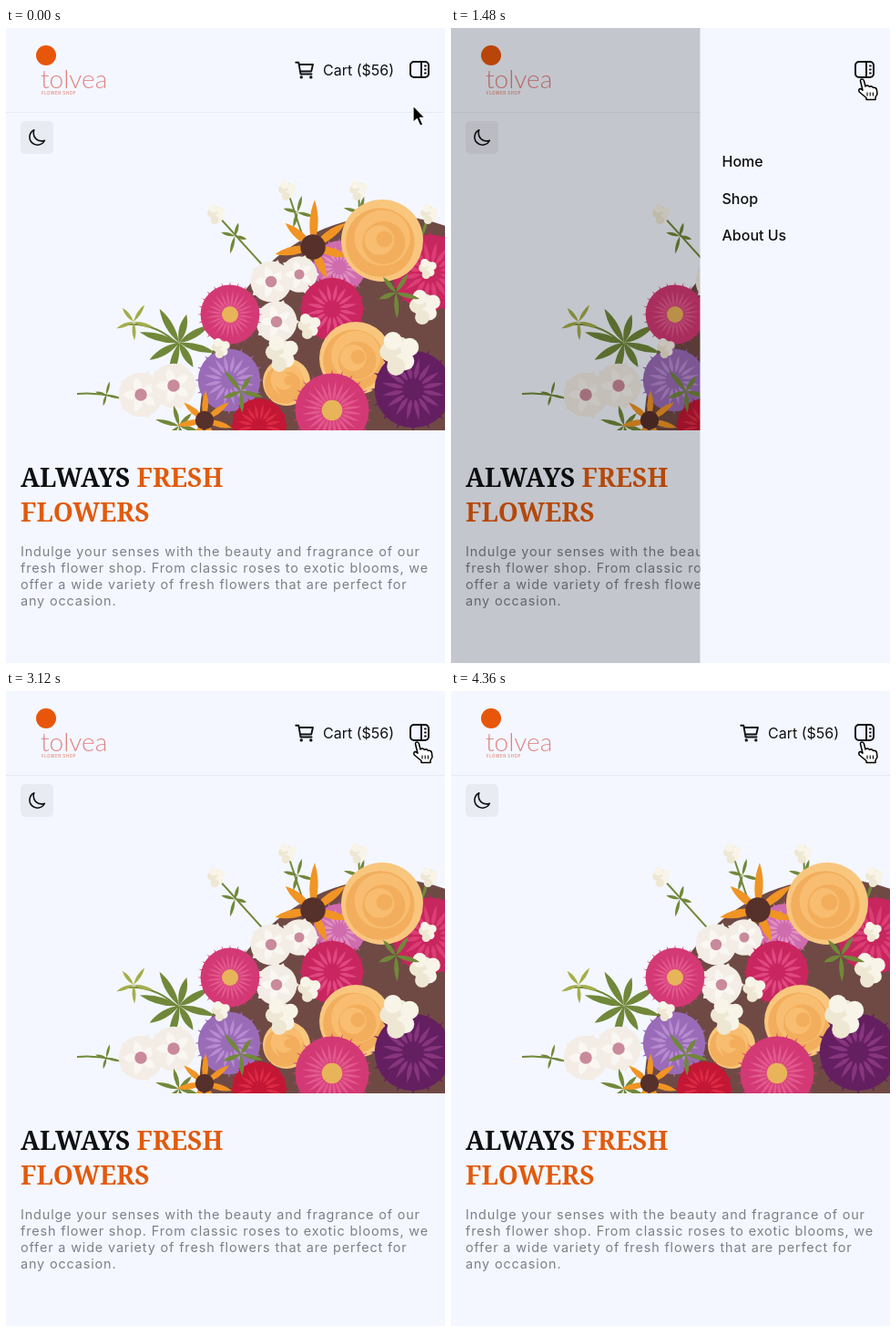
An HTML page for the animation above (4640 ms loop, 482x696 px).

```html
<!DOCTYPE html>
<html lang="en">
<head>
<meta charset="utf-8">
<title>Flower shop menu</title>
<style>
  html, body { margin: 0; width: 100%; height: 100%; overflow: hidden; background: #f4f7ff; }
  svg { display: block; width: 100vw; height: 100vh; }
  text { font-family: Inter, "Liberation Sans", sans-serif; fill: #0f1013; }
  .title { font: 700 28px "Noto Serif", serif; }
  .accent { fill: #e25a0c; }
  .copy { font-size: 14.4px; letter-spacing: .06em; fill: #7d7f86; }
  .label { font-size: 16px; }
  .menu text { font-size: 16px; font-weight: 500; }
  .brand { font: 300 28px Lato, sans-serif; fill: #e08484; }
  .tagline { font-size: 4.5px; letter-spacing: .5px; fill: #df6c55; }
  .icon { fill: none; stroke: #0f1013; stroke-width: 2; stroke-linecap: round; stroke-linejoin: round; }
  .glyph { stroke-width: 40; }
</style>
</head>
<body>
<svg viewBox="0 0 482 696" preserveAspectRatio="none">
  <clipPath id="photo"><rect x="76" y="158" width="406" height="283"/></clipPath>

  <rect width="482" height="696" fill="#f4f7ff"/>
  <path d="M0 92.5H482" stroke="#e8ebf3"/>

  <circle cx="44" cy="30" r="11" fill="#e8560c"/>
  <text class="brand" x="38" y="66">tolvea</text>
  <text class="tagline" x="39" y="73">FLOWER SHOP</text>

  <g class="icon glyph" transform="translate(316 34) scale(.047)">
    <circle cx="176" cy="424" r="16"/><circle cx="400" cy="424" r="16"/>
    <path d="M48 80H112L160 352H416M160 288H409L446 128H128"/>
  </g>
  <text class="label" x="348" y="52">Cart ($56)</text>

  <rect x="16" y="102" width="36" height="36" rx="5" fill="#e9ebf3"/>
  <path class="icon glyph" transform="translate(23.8 109.8) scale(.04)"
    d="M160 136c0-31 5-62 16-88a216 216 0 1 0 288 288c-26 11-57 16-88 16a216 216 0 0 1-216-216z"/>

  <g id="bouquet" clip-path="url(#photo)"></g>

  <text class="title" x="16" y="503">ALWAYS <tspan class="accent">FRESH</tspan></text>
  <text class="title accent" x="16" y="541">FLOWERS</text>
  <text class="copy" x="16" y="579">Indulge your senses with the beauty and fragrance of our</text>
  <text class="copy" x="16" y="597">fresh flower shop. From classic roses to exotic blooms, we</text>
  <text class="copy" x="16" y="615">offer a wide variety of fresh flowers that are perfect for</text>
  <text class="copy" x="16" y="633">any occasion.</text>

  <rect id="shade" width="482" height="696"/>
  <g id="panel" class="menu">
    <rect width="256" height="696" fill="#f4f7ff"/>
    <text x="24" y="152">Home</text>
    <text x="24" y="193">Shop</text>
    <text x="24" y="233">About Us</text>
  </g>

  <g class="icon">
    <rect x="444" y="37" width="20" height="17" rx="4"/>
    <path d="M456 37V54M460 41.5h.8M460 45.5h.8M460 49.5h.8"/>
  </g>

  <g id="cursor" stroke-linejoin="round">
    <path id="arrow" d="M0 0V18.5L4.2 14.6 7.6 22.2 10.8 20.8 7.5 13.4H13Z" stroke="#fff" stroke-width="1.2"/>
    <g id="hand" fill="#fff" stroke="#000" stroke-width="1.5">
      <path d="M-3.5 2Q-3.6 0-1.7 0Q0 0 .5 2L2 8Q4.5 6 6.3 8.4Q8.8 7 10.5 9.4Q13.8 8.7 14.5 12L15 16.5 13 20V22.5H3V20.5L-4.8 14Q-6 10.8-3.6 10.4L-1 12.2Z"/>
      <path stroke-width="1.1" d="M4 14.5v4M7.2 14.5v4M10.4 14.5v4"/>
    </g>
  </g>
</svg>

<script>
const LOOP = 4640, STAGE = 482, PANEL = 256, DIM = 0.2;
const SLIDE = 300, FADE = 150;
const visits = [{ show: 1321, hide: 2200 }, { show: 3164, hide: 3990 }];

const $ = id => document.getElementById(id);
const clamp = v => Math.min(1, Math.max(0, v));
const lerp = (a, b, k) => a + (b - a) * k;
const easeOut = k => 1 - (1 - k) ** 2;

// cubic-bezier(.4, 0, .2, 1), solved for x by bisection
function easeInOut(x) {
  let lo = 0, hi = 1;
  for (let i = 0; i < 20; i++) {
    const s = (lo + hi) / 2, r = 1 - s;
    if (1.2 * r * r * s + 0.6 * r * s * s + s ** 3 < x) lo = s; else hi = s;
  }
  return lo * lo * (3 - 2 * lo);
}

function add(tag, attrs) {
  const el = document.createElementNS($('bouquet').namespaceURI, tag);
  for (const key in attrs) el.setAttribute(key, attrs[key]);
  $('bouquet').append(el);
}
const dot = (cx, cy, r, fill) => add('circle', { cx, cy, r, fill });

let seed = 7;
const random = () => (seed = seed * 16807 % 2147483647) / 2147483647;

// Pointed leaf or petal growing from (x, y) at an angle in degrees
function leaf(x, y, length, width, angle, fill) {
  add('path', {
    d: `M0 0Q${length / 2} ${-width} ${length} 0Q${length / 2} ${width} 0 0`,
    transform: `translate(${x} ${y}) rotate(${angle})`, fill
  });
}
function spray(x, y, length, count, fill = '#71883a') {
  for (let i = 0; i < count; i++) leaf(x, y, length * (0.75 + random() * 0.4), length / 5, i * 360 / count + 15, fill);
}

// Rings of petals, each ring smaller and turned by half a petal
function flower(x, y, r, petals, shades, heart) {
  dot(x, y, r * 0.9, shades[0]);
  shades.forEach((fill, ring) => {
    const size = r * (1 - ring * 0.27);
    for (let i = 0; i < petals; i++) {
      leaf(x, y, size, size * 2.4 / petals, (i + ring / 2) * 360 / petals, fill);
    }
  });
  dot(x, y, r * 0.25, heart);
}
const rose = (x, y, r) => {
  dot(x, y, r, '#f9c67e');
  for (let k = 1; k < 6; k++) {
    dot(x + 3 * Math.cos(k * 2.4), y + 3 * Math.sin(k * 2.4), r * (1 - k * 0.16), k % 2 ? '#f2ae5c' : '#f8bd70');
  }
};
const aster = (x, y, r) => flower(x, y, r, 24, ['#d33974', '#e2588e', '#d8457b'], '#e8b45a');
const dahlia = (x, y, r, dark, light) => flower(x, y, r, 16, [dark, light, dark], dark);
const phlox = (x, y, r) => flower(x, y, r, 5, ['#f3ede6', '#faf6f1'], '#c98a9b');
const daisy = (x, y, r) => {
  spray(x, y, r, 7, '#f09424');
  dot(x, y, r * 0.3, '#56302a');
};
// Cluster of small white blossoms
function cluster(x, y, r) {
  for (let i = 0; i < 8; i++) {
    const d = r * 0.65 * Math.sqrt(i / 7);
    dot(x + d * Math.cos(i * 2.4), y + d * Math.sin(i * 2.4), r * 0.42, i % 2 ? '#f8f4e8' : '#eee7d3');
  }
}

function drawBouquet() {
  add('ellipse', { cx: 420, cy: 441, rx: 208, ry: 235, fill: '#6f4a45' });

  for (let i = 0; i < 4; i++) {
    const x = 231 + i * 78, y = 204 - 30 * Math.sin(i * Math.PI / 3);
    add('path', { d: `M${x} ${y}L${lerp(x, 400, 0.3)} 260`, stroke: '#71883a', 'stroke-width': 2 });
    spray(lerp(x, 400, 0.12), y + 24, 18, 4);
    cluster(x, y, 11);
  }
  add('path', { d: 'M78 401Q115 398 150 415M130 325Q165 322 190 348', fill: 'none', stroke: '#71883a', 'stroke-width': 2 });
  spray(190, 345, 40, 8);
  spray(140, 322, 20, 5, '#a5ad4a');
  spray(110, 402, 14, 4);

  dahlia(466, 268, 46, '#c7265e', '#dc3d75');
  dahlia(366, 262, 32, '#cf6cae', '#e08fc2');
  daisy(337, 240, 46);
  rose(413, 233, 45);
  phlox(291, 278, 25);
  phlox(322, 270, 22);
  phlox(297, 322, 25);
  dahlia(358, 308, 38, '#c9265f', '#e04882');
  aster(246, 314, 36);
  dahlia(245, 386, 38, '#9a6cb8', '#b78bd0');
  rose(308, 388, 26);
  dahlia(278, 436, 33, '#c31735', '#dc2a45');
  rose(384, 362, 40);
  dahlia(447, 396, 47, '#641f60', '#87357f');
  aster(358, 419, 45);
  cluster(432, 357, 24);
  cluster(460, 306, 19);
  cluster(463, 264, 11);
  cluster(333, 327, 14);
  cluster(303, 357, 20);
  cluster(236, 351, 11);
  spray(428, 290, 26, 5);
  spray(258, 398, 26, 5);
  phlox(148, 402, 27);
  phlox(184, 392, 27);
  spray(190, 436, 24, 6);
  daisy(218, 430, 34);
}

const cursorAt = t => {
  const k = easeOut(clamp((t - 30) / 180));
  return [lerp(447, 453, k), lerp(85, 56, k)];
};

// Progress of an opening and closing move with the given length
const during = (t, length, ease) => visits.reduce((sum, { show, hide }) =>
  sum + ease(clamp((t - show) / length)) - ease(clamp((t - hide) / length)), 0);

function render(t) {
  const left = lerp(STAGE, STAGE - PANEL, during(t, SLIDE, easeInOut));
  $('panel').setAttribute('transform', `translate(${left} 0)`);
  $('shade').setAttribute('opacity', DIM * clamp(during(t, FADE, easeInOut)));
  const [x, y] = cursorAt(t), hover = y < 64;
  $('cursor').setAttribute('transform', `translate(${x} ${y})`);
  $('arrow').style.display = hover ? 'none' : '';
  $('hand').style.display = hover ? '' : 'none';
}

drawBouquet();
const start = performance.now();
function tick() {
  render((performance.now() - start) % LOOP);
  requestAnimationFrame(tick);
}
tick();
</script>
</body>
</html>
```
